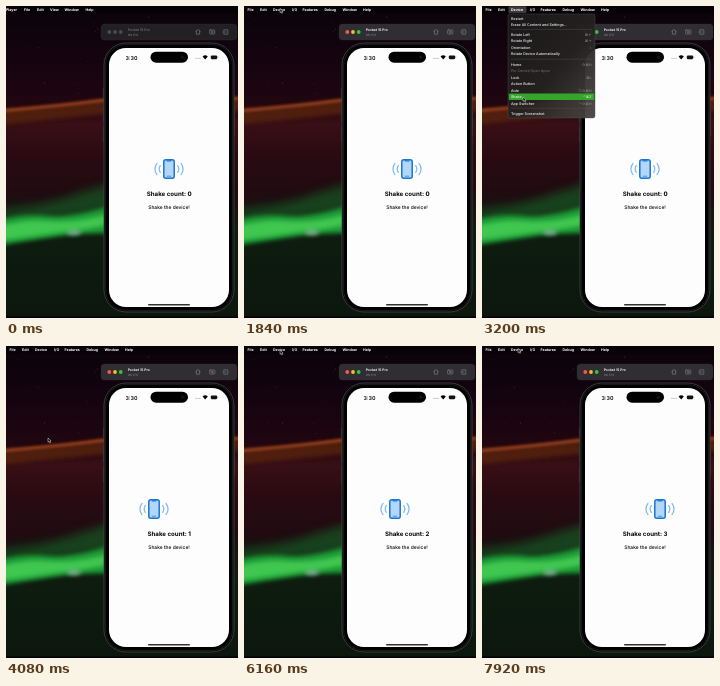
Recreate the animation shown at these times as an HTML page. Size 232 px wide and 312 px high, loop 8 s.

```html
<!DOCTYPE html>
<html lang="en">
<head>
<meta charset="utf-8">
<title>Shake demo</title>
<style>
html, body { margin: 0; width: 100%; height: 100%; overflow: hidden; background: #000; }
svg { display: block; width: 232px; height: 312px; }
text { font-family: Inter, "DejaVu Sans", sans-serif; font-size: 3.65px; font-weight: 500; fill: #f2f2f2; text-rendering: geometricPrecision; white-space: pre; }
.bar text { font-size: 3.6px; font-weight: 700; fill: #fff; }
.mid { text-anchor: middle; fill: #000; }
.end { text-anchor: end; fill: #8b8986; font-size: 3.5px; }
.line { fill: none; stroke-linecap: round; stroke-linejoin: round; }
</style>
</head>
<body>
<svg viewBox="0 0 232 312">
  <defs>
    <linearGradient id="sky" x2="0" y2="1">
      <stop offset="0" stop-color="#0b030a"/>
      <stop offset=".2" stop-color="#160410"/>
      <stop offset=".31" stop-color="#200610"/>
      <stop offset=".38" stop-color="#380f15"/>
      <stop offset=".48" stop-color="#2a0a12"/>
      <stop offset=".6" stop-color="#200b11"/>
      <stop offset=".7" stop-color="#121a10"/>
      <stop offset=".78" stop-color="#0d1c0f"/>
      <stop offset="1" stop-color="#0c160d"/>
    </linearGradient>
    <linearGradient id="glass" x2="1" y2="1">
      <stop offset="0" stop-color="#191818"/>
      <stop offset=".55" stop-color="#252121"/>
      <stop offset="1" stop-color="#494543"/>
    </linearGradient>
    <filter id="crisp" x="-20%" y="-50%" width="140%" height="200%"><feGaussianBlur stdDeviation=".8"/></filter>
    <filter id="soft" x="-50%" y="-50%" width="200%" height="200%"><feGaussianBlur stdDeviation="2.2"/></filter>
    <filter id="wide" x="-50%" y="-50%" width="200%" height="200%"><feGaussianBlur stdDeviation="5"/></filter>
  </defs>

  <rect width="232" height="312" fill="url(#sky)"/>
  <g id="stars" fill="#a99aa6"/>
  <path d="M-10 104 Q50 99 98 93 L242 91 V105 L98 108 Q50 113 -10 119Z" fill="#56200f" opacity=".85" filter="url(#soft)"/>
  <path d="M-10 103.5 Q50 99 98 92.5 L242 91 V94 L98 96 Q50 102 -10 107Z" fill="#8a3a1e" filter="url(#crisp)"/>
  <path d="M-10 204 Q40 200 70 188 L110 176 V204 L50 212 L-10 214Z" fill="#155323" opacity=".75" filter="url(#wide)"/>
  <path d="M-10 214 Q20 207 45 210 Q70 211 110 198 V227 Q75 227 55 230 Q20 235 -10 240Z" fill="#1f9a35" filter="url(#soft)"/>
  <path d="M-10 221 Q20 213 42 215 Q70 218 110 206 V217 Q80 224 55 226 Q20 231 -10 235Z" fill="#46cf55" opacity=".85" filter="url(#soft)"/>
  <ellipse cx="68" cy="226.5" rx="7" ry="2.8" fill="#94b4a8" opacity=".8" filter="url(#soft)"/>
  <rect y="310.5" width="232" height="1.5"/>

  <g id="window">
    <rect id="titlebar" x="95" y="18" width="136" height="16" rx="3.5" stroke="#363438" stroke-width=".3"/>
    <g id="lights"><circle cx="103.3" cy="26" r="1.9"/><circle cx="109" cy="26" r="1.9"/><circle cx="114.7" cy="26" r="1.9"/></g>
    <text id="title" x="121.7" y="25.1" style="font-size:3.4px;font-weight:700">Pocket 15 Pro</text>
    <text x="121.7" y="29.6" style="font-size:3px;fill:#858388">OS 17.0</text>
    <g class="line" stroke="#858388" stroke-width=".6">
      <path d="M189.7 25.5 L192 23.4 L194.3 25.5 M190.4 25 V28.2 H193.6 V25"/>
      <rect x="203.6" y="24" width="5.2" height="4" rx=".6"/><circle cx="206.2" cy="26" r=".9"/>
      <path d="M217.8 25 V23.8 H221.8 V28.2 H217.8 V27 M216.8 26 H220"/>
    </g>
  </g>

  <rect x="98" y="37" width="130" height="269" rx="22" fill="#050505" stroke="#46474a" stroke-width=".8"/>
  <rect x="99.6" y="38.6" width="126.8" height="265.8" rx="20.5" fill="#000" stroke="#202124" stroke-width=".8"/>
  <path d="M97.4 82 V91 M97.4 101 V116 M97.4 121 V136 M228.6 105 V130" stroke="#3b3c3f" stroke-width=".8"/>
  <rect x="103" y="42" width="120" height="259" rx="17" fill="#fdfdfd"/>
  <rect x="144.5" y="45.7" width="37.5" height="11" rx="5.5"/>
  <circle cx="176.5" cy="51.2" r="1.6" fill="#11131c"/>
  <text class="mid" x="125.5" y="53.6" style="font-size:5.4px;font-weight:600">3:30</text>
  <g fill="#a7a7a7"><circle cx="190" cy="52.4" r=".55"/><circle cx="192" cy="52.4" r=".55"/><circle cx="194" cy="52.4" r=".55"/></g>
  <path d="M196.6 50.4 Q199.2 48.2 201.8 50.4 L199.2 53.5Z"/>
  <rect x="204.8" y="49.4" width="6.4" height="3.8" rx="1.1" fill="#111"/>
  <rect x="211.6" y="50.7" width=".6" height="1.3" fill="#888"/>
  <rect x="142" y="298" width="42" height="1.5" rx=".75" fill="#333"/>

  <g id="icon" class="line" stroke="#7db8f2" stroke-width="1.2">
    <rect x="-5.2" y="-9.3" width="10.4" height="18.6" rx="2" fill="#b3d7fa" stroke="#1974d2" stroke-width="1.5"/>
    <path d="M-2 -8.2 H2" stroke="#1974d2" stroke-width="1.3"/>
    <path d="M-1.8 7.2 H1.8" stroke="#1974d2" stroke-width=".7"/>
    <path d="M-8.7 -3.4 Q-10.9 0 -8.7 3.4 M-12 -5.6 Q-16.2 0 -12 5.6"/>
    <path d="M8.7 -3.4 Q10.9 0 8.7 3.4 M12 -5.6 Q16.2 0 12 5.6"/>
  </g>
  <text id="count" class="mid" x="163.2" y="190.2" style="font-size:6.15px;font-weight:700"></text>
  <text class="mid" x="163" y="202.7" style="font-size:4.9px;font-weight:550">Shake the device!</text>

  <rect width="232" height="7.5" fill="#000" opacity=".4"/>
  <rect id="tab" x="26.5" y=".3" width="18" height="6.8" rx="1.2" fill="#fff" opacity=".22"/>
  <g id="barA" class="bar"></g>
  <g id="barB" class="bar"></g>

  <g id="menu">
    <rect x="26" y="8" width="87" height="104" rx="2" fill="url(#glass)" fill-opacity=".96" stroke="#56504d" stroke-width=".4"/>
    <rect id="mark" x="26.8" width="85.4" height="6.5" rx="1" fill="#35a52b"/>
    <g id="rows"></g>
    <path d="M29 23.4 H110 M29 53.2 H110 M29 102.2 H110" stroke="#5a5654" stroke-width=".4"/>
  </g>
  <path id="cursor" d="M0 0 V4.2 L1 3.3 L1.8 4.9 L2.5 4.5 L1.8 3 H3.1Z" stroke="#fff" stroke-width=".45" stroke-linejoin="round"/>
</svg>

<script>
const $ = id => document.getElementById(id);
const LOOP = 8000, SWAP = 920;

function add(parent, tag, attrs, label = '') {
  const el = document.createElementNS('http://www.w3.org/2000/svg', tag);
  for (const k in attrs) el.setAttribute(k, attrs[k]);
  el.textContent = label;
  return parent.appendChild(el);
}

let seed = 11;
const rnd = () => (seed = seed * 16807 % 2147483647) / 2147483647;
for (let i = 0; i < 45; i++)
  add($('stars'), 'circle', { cx: rnd() * 232, cy: 9 + rnd() * 85, r: .2 + rnd() * .25, opacity: .2 + rnd() * .5 });

const bar = (id, items) => items.forEach(([label, x]) =>
  add($(id), 'text', { x, y: 4.8 }, label));
bar('barA', [['Player', 0], ['File', 18], ['Edit', 31], ['View', 44], ['Window', 58.5], ['Help', 79.5]]);
bar('barB', [['File', 3.5], ['Edit', 16], ['Device', 29], ['I/O', 48], ['Features', 58.5], ['Debug', 80.5], ['Window', 98.5], ['Help', 119]]);

// label, centre y, shortcut
const rows = [
  ['Restart', 12.6, ''], ['Erase All Content and Settings…', 18.8, ''],
  ['Rotate Left', 28.6, '⌘←'], ['Rotate Right', 35.1, '⌘→'], ['Orientation', 41.6, '›'],
  ['Rotate Device Automatically', 48.1, ''],
  ['Home', 58.2, '⇧⌘H'], ['Pin Center/Open Apps', 64.7, ''], ['Lock', 71.2, '⌘L'],
  ['Action Button', 77.7, ''], ['Aide', 84.2, '⌥⇧⌘H'], ['Shake', 90.7, '⌃⌘Z'],
  ['App Switcher', 97.2, '⌃⇧⌘H'], ['Trigger Screenshot', 107.2, '']
];
const keys = rows.map(([label, y, key]) => {
  const t = add($('rows'), 'text', { x: 29, y: y + 1.3 }, label);
  if (label.startsWith('Pin')) t.style.fill = '#696563';
  return add($('rows'), 'text', { x: 109.5, y: y + 1.3, class: 'end' }, key);
});

// time, x, y of the pointer
const path = [
  [0, 240, 110], [300, 240, 110], [800, 150, 28], [1000, 150, 28], [1760, 36, 2.5], [2250, 36, 2.5],
  [3000, 41, 91], [4080, 42, 92], [4600, 36, 2.5], [4800, 36, 2.5], [5360, 39, 87], [5460, 39, 90.5],
  [5700, 39, 91], [6200, 36, 2.5], [6420, 36, 2.5], [6960, 39, 87.2], [7060, 39, 90.5], [7260, 39, 91],
  [7780, 36, 2.5], [LOOP, 36, 2.5]
];
const opens = [[2080, 3340], [4720, 5520], [6340, 7120]];
const shakes = [3580, 5620, 7220];

function pointer(t) {
  const i = path.findIndex(p => p[0] > t), a = path[i - 1], b = path[i];
  const u = (t - a[0]) / (b[0] - a[0]), e = u * u * (3 - 2 * u);
  return [a[1] + (b[1] - a[1]) * e, a[2] + (b[2] - a[2]) * e];
}

function draw(t) {
  const active = t >= SWAP;
  $('barA').style.display = active ? 'none' : '';
  $('barB').style.display = active ? '' : 'none';
  $('titlebar').style.fill = active ? '#302e32' : '#222023';
  $('title').style.fill = active ? '#f0eef2' : '#69676c';
  [...$('lights').children].forEach((c, i) =>
    c.setAttribute('fill', active ? ['#f9574f', '#f7bd2f', '#2bc840'][i] : '#4d4b4f'));

  const [x, y] = pointer(t);
  $('cursor').setAttribute('transform', `translate(${x} ${y})`);

  const open = opens.find(([a, b]) => t >= a && t < b + 160);
  const fade = open ? Math.min(1, 1 - (t - open[1]) / 160) : 0;
  $('menu').setAttribute('opacity', fade);
  $('tab').style.display = fade === 1 ? '' : 'none';
  const hit = rows.findIndex(r => Math.abs(r[1] - y) <= 3.25);
  $('mark').style.display = hit < 0 || rows[hit][0].startsWith('Pin') ? 'none' : '';
  if (hit >= 0) $('mark').setAttribute('y', rows[hit][1] - 3.25);
  keys.forEach((k, i) => k.style.fill = i === hit ? '#d5efcf' : '');

  const done = shakes.filter(s => s <= t);
  const age = t - (done.length ? done[done.length - 1] : -LOOP);
  const dx = age < 1200 ? -15 * Math.sin(age / 200 * Math.PI) : 0;
  $('icon').setAttribute('transform', `translate(${163 + dx} 163)`);
  $('count').textContent = 'Shake count: ' + done.length;
}

const start = performance.now();
function tick() {
  draw((performance.now() - start) % LOOP);
  requestAnimationFrame(tick);
}
tick();
</script>
</body>
</html>
```
